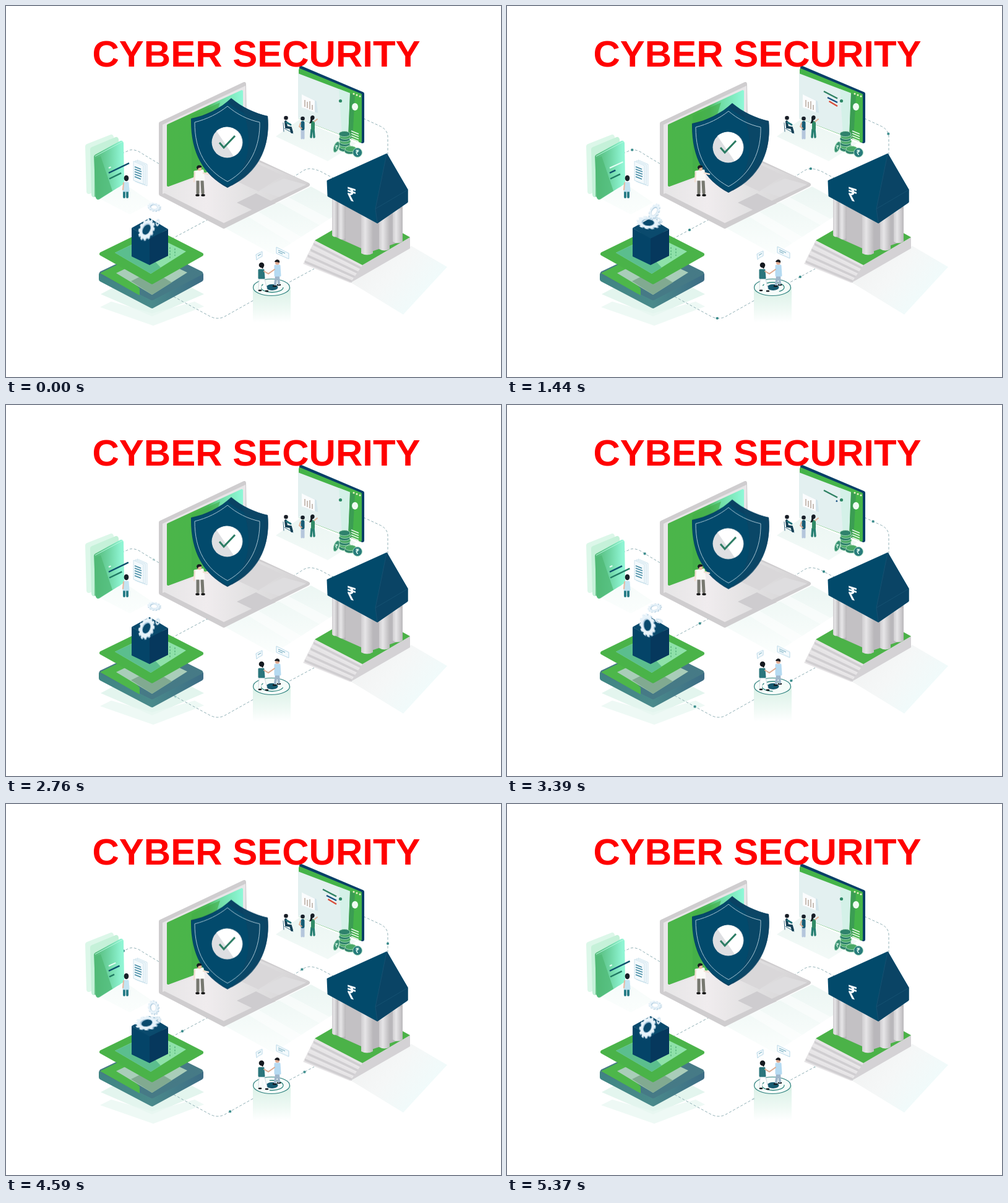
Recreate the animation shown at these times as an HTML page. Size 800 px wide and 600 px high, loop 5.4 s.

```html
<!DOCTYPE html>
<html lang="en">
<head>
<meta charset="utf-8">
<title>Cyber security</title>
<style>
html, body { margin: 0; width: 100%; height: 100%; overflow: hidden; background: #fff; }
svg { display: block; width: 800px; height: 600px; }
text { font-family: "Liberation Sans", Arial, sans-serif; font-weight: bold; }
.round { stroke-linejoin: round; }
.thin { fill: none; stroke-linecap: round; }
.dash { fill: none; stroke: #8fafb5; stroke-width: 1; stroke-dasharray: 4 3; }
.dot, .anim, .shield, .gear, .bar { animation: 2.7s linear infinite; }
.dot { fill: #2f8585; offset-rotate: 0deg; animation-name: travel; }
@keyframes travel {
  0% { offset-distance: var(--from, 0%); opacity: 0; }
  9%, 90% { opacity: 1; }
  100% { offset-distance: 100%; opacity: 0; }
}
.shield { animation-name: float; }
@keyframes float {
  0%, 100% { transform: translateY(0); animation-timing-function: cubic-bezier(.37,0,.63,1); }
  53% { transform: translateY(8px); animation-timing-function: cubic-bezier(.37,0,.63,1); }
}
.bar { fill: none; stroke-dasharray: 100 200; }
@keyframes barA {
  0%, 100% { stroke-dashoffset: 0; } 24.4% { stroke-dashoffset: 38; }
  53.3% { stroke-dashoffset: 72; } 70% { stroke-dashoffset: 47; } 76.7% { stroke-dashoffset: 28; }
}
@keyframes barB {
  0%, 100% { stroke-dashoffset: 40; } 24.4% { stroke-dashoffset: 0; }
  53.3% { stroke-dashoffset: 50; } 70%, 76.7% { stroke-dashoffset: 75; }
}
@keyframes barC {
  0%, 24.4%, 100% { stroke-dashoffset: 85; } 53.3% { stroke-dashoffset: 10; } 76.7% { stroke-dashoffset: 70; }
}
@keyframes rowG {
  0%, 7%, 95%, 100% { stroke-dashoffset: 100; } 22%, 75% { stroke-dashoffset: 0; } 77% { stroke-dashoffset: 8; }
}
@keyframes rowB {
  0%, 23%, 93%, 100% { stroke-dashoffset: 100; } 24%, 25.6% { stroke-dashoffset: 86; }
  35%, 74% { stroke-dashoffset: 0; } 77% { stroke-dashoffset: 9; }
}
@keyframes rowR {
  0%, 36%, 92%, 100% { stroke-dashoffset: 100; } 48%, 75% { stroke-dashoffset: 0; } 77% { stroke-dashoffset: 6; }
}
@keyframes gearBig {
  0%, 100% { transform: translate(227px,361px) rotate(25deg) scale(1.15,1.75); }
  24.4% { transform: translate(226.5px,356px) rotate(-10deg) scale(1.15,1.85); }
  53.3% { transform: translate(228px,350px) rotate(5deg) scale(1.85,1); }
  70% { transform: translate(227px,354px) rotate(-8deg) scale(1.8,1.1); }
  76.7% { transform: translate(225px,357px) rotate(-12deg) scale(1.8,1.1); }
}
@keyframes gearTop {
  0%, 100% { transform: translate(239px,325px) rotate(10deg) scale(1.05,.65); }
  24.4% { transform: translate(238px,328px) rotate(-15deg) scale(1.1,.65); }
  53.3% { transform: translate(238px,332px) rotate(28deg) scale(.75,1.35); }
  70% { transform: translate(238px,329px) rotate(-10deg) scale(.85,1.15); }
  76.7% { transform: translate(238px,328px) rotate(-15deg) scale(.75,1.05); }
}
@keyframes gearSmall {
  0%, 100% { transform: translate(245px,350px) rotate(10deg) scale(.3,.6); }
  24.4% { transform: translate(245px,349px) rotate(15deg) scale(.6,.35); }
  53.3% { transform: translate(243px,345px) rotate(30deg) scale(.85,.4); }
  70%, 76.7% { transform: translate(244px,349px) rotate(-10deg) scale(.6,.6); }
}
@keyframes sweep { to { stroke-dashoffset: -100; } }
@keyframes bob { 0%, 100% { transform: translateY(0); } 50% { transform: translateY(-1px); } }
</style>
</head>
<body>
<svg viewBox="0 0 800 600">
<defs>
  <linearGradient id="screen">
    <stop offset="0" stop-color="#4bb54a"/><stop offset=".4" stop-color="#4ab54a"/>
    <stop offset=".55" stop-color="#4cb85c"/><stop offset=".7" stop-color="#6fdca4"/><stop offset="1" stop-color="#8ef7d6"/>
  </linearGradient>
  <linearGradient id="deck">
    <stop offset="0" stop-color="#e6e5e6"/><stop offset=".3" stop-color="#f0ecee"/><stop offset=".6" stop-color="#e2e1e2"/><stop offset="1" stop-color="#d3d1d3"/>
  </linearGradient>
  <linearGradient id="phone" x2="1" y2="0">
    <stop offset="0" stop-color="#57bd7d"/><stop offset=".5" stop-color="#6fd6a5"/><stop offset="1" stop-color="#90f5d4"/>
  </linearGradient>
  <linearGradient id="column">
    <stop offset="0" stop-color="#cfcdd0"/><stop offset=".35" stop-color="#e6e5e7"/><stop offset="1" stop-color="#bab8bb"/>
  </linearGradient>
  <linearGradient id="beam" x2="0" y2="1">
    <stop offset="0" stop-color="#d9f0e6"/><stop offset=".6" stop-color="#eef9f4"/><stop offset="1" stop-color="#fff"/>
  </linearGradient>
  <linearGradient id="shade" x2="1" y2=".6">
    <stop offset="0" stop-color="#f0f1f1"/><stop offset=".5" stop-color="#f5f7f7"/><stop offset="1" stop-color="#effcfc"/>
  </linearGradient>
  <linearGradient id="haze" x2="0" y2="1">
    <stop offset="0" stop-color="#ecf6f3"/><stop offset="1" stop-color="#fbfefd"/>
  </linearGradient>
  <linearGradient id="side">
    <stop offset="0" stop-color="#3f8583"/><stop offset=".5" stop-color="#4a8a8b"/><stop offset="1" stop-color="#3d6d85"/>
  </linearGradient>
  <g id="gear" fill="none">
    <g stroke="#9fc0d6" transform="translate(1 .8)"><circle r="7.2" stroke-width="3.4"/><circle r="9.4" stroke-width="2" stroke-dasharray="2.46"/></g>
    <g stroke="#e8f3fa"><circle r="7.2" stroke-width="3.4"/><circle r="9.4" stroke-width="2" stroke-dasharray="2.46"/></g>
    <circle r="5.5" stroke="#b4d0e3" stroke-width=".6"/>
  </g>
</defs>

<!-- floor tints -->
<path fill="url(#haze)" d="M354 359 493 292 528 311V341L432 402Z"/>
<path fill="#fff" opacity=".5" d="M392 341 408 333 478 374 462 384ZM440 317 456 309 524 345 508 355Z"/>
<path fill="url(#shade)" d="M557 447 655 388 713 422 642 499Z"/>
<path fill="url(#haze)" d="M150 311 192 288 236 318 200 337ZM436 211 474 184 566 222 520 251Z"/>
<path fill="#e3f5ee" d="M153 466 236 422 320 466 236 502Z"/>
<path fill="#eaf8f3" opacity=".8" d="M152 487 170 478 236 497 305 478 320 486 238 517Z"/>
<path fill="url(#beam)" d="M399 455H460V512H399Z"/>

<g id="routes"></g>

<!-- laptop -->
<path class="round" fill="#cfcdcf" stroke="#cfcdcf" stroke-width="6" d="M250 190 385 126 387 242 488 289 352 357 250 304Z"/>
<path fill="#e8e6e8" d="M253 192 387 129V246L253 304Z"/>
<path class="round" fill="url(#screen)" stroke="url(#screen)" stroke-width="4" d="M262 193 381 138V246L262 290Z"/>
<path fill="#43ae49" d="M300 177 346 156 316 250 300 274Z" opacity=".6"/>
<path fill="url(#deck)" d="M253 301 385 242 489 286 352 351Z"/>
<path fill="#d9d7d9" d="M408 300 372 283 400 252 447 274Z"/>
<path fill="#cecccf" d="M373 318 404 303 436 319 404 333Z"/>
<path fill="#dedddf" d="M410 298 449 279 485 289 441 309Z"/>

<!-- shield -->
<g class="shield">
  <path fill="#0a4263" d="M364 149C382 164 402 173 423 178 427 221 414 266 358 294 318 273 298 236 299 182 323 177 346 166 364 149Z"/>
  <path fill="#024a6c" d="M358 155C374 170 396 180 417 184 419 224 404 266 358 292 319 272 299 238 300 183 323 178 342 169 358 155Z"/>
  <path fill="#0d4766" d="M380 161C394 170 408 175 423 178 427 221 414 266 364 291 395 255 400 210 380 161Z" opacity=".8"/>
  <path fill="none" stroke="#a9c5d3" d="M358 162C373 175 391 184 410 188 411 225 396 263 358 284 323 265 305 235 305 188 325 183 343 174 358 162Z"/>
  <circle cx="357.500" cy="220.500" r="25" fill="#dedfe2"/>
  <path fill="#fff" d="M340 202A25 25 0 1 1 368 243Z"/>
  <path fill="none" stroke="#2b7c63" stroke-width="3" d="M345 221 352 229 370 210"/>
</g>
<!-- presenter -->
<path class="thin" stroke="#777870" stroke-width="5" d="M310 283V302M317 283 318 302"/>
<path class="thin" stroke="#111" stroke-width="3.500" d="M308 306H311M317 306H320"/>
<path class="round" fill="#fbfaf7" stroke="#fbfaf7" stroke-width="3" d="M305 268 318 266 320 281H307Z"/>
<path class="thin" stroke="#f2ded2" stroke-width="2.500" d="M319 270 327 272M305 269 304 284"/>
<circle cx="312.500" cy="263" r="3.500" fill="#e9b79c"/><path fill="#1b1b22" d="M308 262Q308 257 313 257.500 317 258 316 261L311 262 310 265Z"/>

<!-- phone -->
<g class="round" stroke-width="8">
  <path fill="#dcf7e9" stroke="#dcf7e9" d="M132 227 170 212 174 289 134 300Z"/>
  <path fill="#c5f1d9" stroke="#c5f1d9" d="M140 232 178 216 182 289 142 305Z"/>
  <path fill="url(#phone)" stroke="url(#phone)" d="M146 244 186 222 187 285 149 309Z"/>
</g>
<path fill="#4fba76" d="M143 247 153 243 172 299 150 312 143 308Z" opacity=".75"/>
<path fill="none" stroke="#b8f8e0" d="M144 243 189 219"/>
<path class="bar" pathLength="100" stroke="#e5fff5" stroke-width="2" style="animation-name:barC" d="M166 262 190 251"/>
<path class="bar" pathLength="100" stroke="#0c506d" stroke-width="2.500" style="animation-name:barA" d="M166 270 199 254"/>
<path class="bar" pathLength="100" stroke="#217b64" stroke-width="2.500" style="animation-name:barB" d="M167 279.500 199 264"/>
<path class="thin" stroke="#277d87" stroke-width="4" d="M191 300V309M196 300V309"/>
<path class="round" fill="#c4e4f2" stroke="#c4e4f2" stroke-width="3" d="M191 286H197L198 299H190Z"/>
<path class="thin" stroke="#e8b79e" stroke-width="2" d="M190 286 189 297"/>
<ellipse cx="194.500" cy="278.500" rx="3.800" ry="4.800" fill="#182129"/>
<!-- sheets -->
<g fill="#f3f9fc" stroke="#c5dfea" stroke-width=".8">
  <path d="M212 249 228 256V291L212 285Z"/><path d="M209 250 225 257V289L209 284Z"/><path d="M206 251 222 258V288L206 282Z"/>
</g>
<path fill="none" stroke="#438ba4" stroke-width="1.500" d="M208 260 218 264M208 264 219 268M208 268 219 272M208 272 219 276M208 276 218 280"/>

<!-- dashboard -->
<path class="round" fill="#073f67" stroke="#073f67" stroke-width="6" d="M477 100 576 142V219L480 178Z"/>
<path class="round" fill="#45b449" stroke="#45b449" stroke-width="4" d="M475 103 573 143.500V219L475 181Z"/>
<path fill="#e3f0f0" d="M472 109 556 141 553 213 475 183Q472 182 472 180Z"/>
<path fill="#cff2e5" d="M538 134 556 141 553 213 543 209Z" opacity=".7"/>
<path fill="#3b9d53" d="M556 141 564 144 560 216 553 213Z"/>
<g fill="#f0f3c8"><circle cx="562" cy="142" r="1.500"/><circle cx="567" cy="144" r="1.500"/><circle cx="572" cy="146" r="1.500"/></g>
<ellipse cx="564" cy="163" rx="5" ry="6" fill="#f0fbf3"/>
<path fill="none" stroke="#e9f8ea" stroke-width="1.700" d="M558 202 570 207M558 206 570 211M558 210 570 215M558 214 570 219"/>
<path fill="#d2e4eb" d="M480 144 502 154 504 173 482 166Z"/>
<path fill="#fbfcfd" d="M478 143 499 153V172L478 164Z"/>
<path fill="none" stroke="#b9a99e" stroke-width="1.500" d="M483 163V152M487 165V155M491 167V154M495 168V160"/>
<path class="bar" pathLength="100" stroke="#2e8062" stroke-width="2.500" style="animation-name:rowG" d="M534 149.500 512 138"/>
<path class="bar" pathLength="100" stroke="#164d82" stroke-width="2.500" style="animation-name:rowB" d="M534 156 518 148"/>
<path class="bar" pathLength="100" stroke="#d84d3b" stroke-width="2.500" style="animation-name:rowR" d="M534 162 520.500 154"/>
<circle cx="540.500" cy="153.500" r="2.600" fill="#2e8967"/>
<!-- viewers -->
<path class="thin" stroke="#36677f" stroke-width="1" d="M448 189 449 203M450 198 464 206"/>
<path class="thin" stroke="#143f55" stroke-width="4" d="M452 187 453 196 460 197 462 204"/>
<path class="thin" stroke="#1d7079" stroke-width="3" d="M453 188 460 192"/>
<circle cx="452.500" cy="181" r="3.300" fill="#191e27"/>
<path class="thin" stroke="#b5c6dc" stroke-width="3" d="M478 201V214M481 201V214"/>
<path class="thin" stroke="#175b75" stroke-width="6" d="M479.500 189V198"/>
<path class="thin" stroke="#dba98e" stroke-width="1.700" d="M476 189 474 195 478 198"/>
<circle cx="479.500" cy="182" r="3.300" fill="#18202a"/>
<path class="thin" stroke="#277f72" stroke-width="3.500" d="M494 200 493 212M497 200 498 212"/>
<path class="thin" stroke="#318b66" stroke-width="6" d="M496 189V198"/>
<path class="thin" stroke="#e1b195" stroke-width="2" d="M498 187 503 183"/>
<path fill="#161c24" d="M492 181Q492 177 496 177 500 178 498 183L495 185Q495 190 490 190 493 185 492 181Z"/>
<g id="coins" stroke="#b4e2c2" stroke-width=".8"></g>
<g fill="#388f72" stroke="#a0d6b9" stroke-width="1">
  <ellipse cx="534" cy="228" rx="4" ry="9" transform="rotate(20 534 228)"/>
  <circle cx="568" cy="237" r="7.500" fill="#277b7c"/>
</g>
<text x="564.500" y="241" font-size="11" fill="#e9fff5">₹</text>
<text x="531.500" y="232" font-size="9" fill="#d0f3df">₹</text>

<!-- bank -->
<g id="steps"></g>
<path fill="#d4d2d5" d="M576 419 653 374V392L556 448Z"/>
<path fill="#4bb248" d="M499 379 530 361 610 350 653 374 576 419Z"/>
<path fill="#b9b7bb" d="M527 310 600 345 641 322V380L588 398 527 371Z"/>
<path fill="#c3c1c4" d="M549 325 575 338V392L549 380Z"/>
<g id="columns" fill="url(#column)"></g>
<g class="round" stroke-width="3">
  <path fill="#024a6b" stroke="#024a6b" d="M520 283 615 240 648 297V317L600 350 521 307Z"/>
  <path fill="#0a4465" stroke="#0a4465" stroke-width="1" d="M615 240 649 297V317L600 351 597 328Z"/>
</g>
<path fill="none" stroke="#1d5c7b" stroke-width=".6" d="M615 240 597 328 600 350M597 328 648 298"/>
<text transform="translate(550 313) skewY(17)" font-size="28" fill="#f6fcff">₹</text>

<!-- server stack -->
<path class="round" fill="url(#side)" stroke="url(#side)" stroke-width="8" d="M154 434 236 394 315 434V442L236 485 154 442Z"/>
<path class="round" fill="#467a86" stroke="#467a86" stroke-width="6" d="M154 432 236 393 315 432 236 473Z"/>
<path fill="#4db74a" d="M152 432 236 391 250 398 192 432 216 457V468Z"/>
<path fill="#a9cdb9" d="M178 432 236 404 293 431 236 467Z"/>
<path fill="#81aa91" d="M202 445 236 428 268 447 236 467Z"/>
<path class="round" fill="#4ab349" stroke="#4ab349" stroke-width="6" d="M154 401 236 361 316 402 236 447Z"/>
<path fill="#8ee1a9" d="M176 399 236 370 291 397 234 433Z"/>
<path fill="#5bbe8e" d="M176 399 212 382 250 423 234 433Z"/>
<path fill="none" stroke="#69c38b" stroke-width="2" stroke-dasharray="3 2" d="M265 390V408M273 392V404"/>
<path fill="#0a4a6d" d="M203 359 232 343 262 361 232 377Z"/>
<path fill="#044468" d="M203 359 232 376V419L203 405Z"/>
<path fill="#06385d" d="M262 361 232 376V419L262 404Z"/>
<use href="#gear" class="gear" style="animation-name:gearSmall"/>
<use href="#gear" class="gear" style="animation-name:gearBig"/>
<use href="#gear" class="gear" style="animation-name:gearTop"/>

<!-- handshake -->
<ellipse cx="429" cy="455" rx="29.500" ry="13.500" fill="#f5fcf9" stroke="#2e817e" stroke-width="1.200"/>
<ellipse class="anim" style="animation-name:sweep" cx="430" cy="455" rx="18" ry="8" fill="none" stroke="#30867f" stroke-width="1.300" pathLength="100" stroke-dasharray="60 40"/>
<ellipse cx="430" cy="455" rx="9.500" ry="5" fill="#175a70"/>
<path class="thin" stroke="#fff" stroke-width="4.500" d="M412 441 410 457M415 441 420 457"/>
<path class="thin" stroke="#ced9df" stroke-width="1" d="M409 442 408 458M418 442 422 458"/>
<path class="thin" stroke="#14191e" stroke-width="2.500" d="M409 460H412M420 461H423M432 453H436M439 451H443"/>
<path class="thin" stroke="#9fb6cb" stroke-width="4" d="M437 436 435 450M440 436 441 449"/>
<path class="round" fill="#2b767c" stroke="#2b767c" stroke-width="3" d="M409 427H416L417 440H409Z"/>
<path class="round" fill="#b5daf1" stroke="#b5daf1" stroke-width="3" d="M435 420H442L443 436H435Z"/>
<path class="thin" stroke="#dfac92" stroke-width="2" d="M417 429 424 433 434 426"/>
<circle cx="413" cy="419" r="4.300" fill="#151a20"/><path d="M409 420 417 420 415 425Z" fill="#151a20"/>
<circle cx="438.500" cy="415" r="3.500" fill="#dfaa90"/><path d="M434 414Q435 410 439 410 443 411 442 415L437 414Z" fill="#191b20"/>
<g class="anim" style="animation-name:bob" fill="#f4fafd" stroke="#b7d7e7">
  <path d="M404 402 414 397V405L408 408 405 411Z"/>
  <path d="M437 390 457 400V409L437 400Z"/>
  <path fill="none" stroke="#5fa0b6" d="M407 404 412 401M440 395 451 400M440 398 447 401"/>
</g>

<text x="139.500" y="98" font-size="60" fill="#f00">CYBER SECURITY</text>
</svg>
<script>
const NS = "http://www.w3.org/2000/svg";
const add = (parent, tag, attrs) => {
  const el = document.createElementNS(NS, tag);
  for (const key in attrs) el.setAttribute(key, attrs[key]);
  return document.getElementById(parent).appendChild(el);
};

// Dashed routes, each with a dot travelling along it
const routes = [
  ["M247 255 222 240Q210 231 200 233L191 237 168 247", "9%"],
  ["M530 279 513 270Q503 264 491 263 482 264 475 270L458 280"],
  ["M327 345 267 377"],
  ["M271 470 328 501Q340 508 352 503L400 476"],
  ["M446 453 498 425"],
  ["M565 176 604 194Q617 200 617 212V260"]
];
for (const [d, from = "0%"] of routes) {
  add("routes", "path", { d, class: "dash" });
  add("routes", "circle", { r: 2.1, class: "dot", style: `offset-path:path("${d}");--from:${from}` });
}

// Coin piles
const pile = (x, bottom, count) => {
  for (let i = 0; i < count; i++) {
    add("coins", "ellipse", { cx: x + i % 2, cy: bottom - i * 4, rx: 9, ry: 4.5, fill: i % 2 ? "#49a866" : "#2f826c" });
  }
};
pile(547, 231, 7);
pile(556, 235, 2);

// Stairs, from the top landing down
for (let i = 0; i < 4; i++) {
  const x = 499 - i * 4.7, y = 379 + i * 9.5;
  const right = 576 - i * 5, low = 419 + i * 7.2;
  add("steps", "path", { fill: "#e6e4e6", d: `M${x} ${y}L${right} ${low}l-5 7.200L${x - 4.7} ${y + 9.5}Z` });
  add("steps", "path", { fill: "#d0ced1", d: `M${x - 2} ${y + 4}L${right - 2} ${low + 3}v4L${x - 2} ${y + 8}Z` });
}

for (const [x, w, top, bottom] of [
  [527, 9, 312, 373], [537, 12, 318, 377], [574, 19, 335, 402],
  [603, 17, 340, 395], [625, 16, 328, 383]
]) {
  add("columns", "path", { d: `M${x} ${top}h${w}V${bottom - 2}q${-w / 2} 5 ${-w} 0Z` });
}
</script>
</body>
</html>
```
